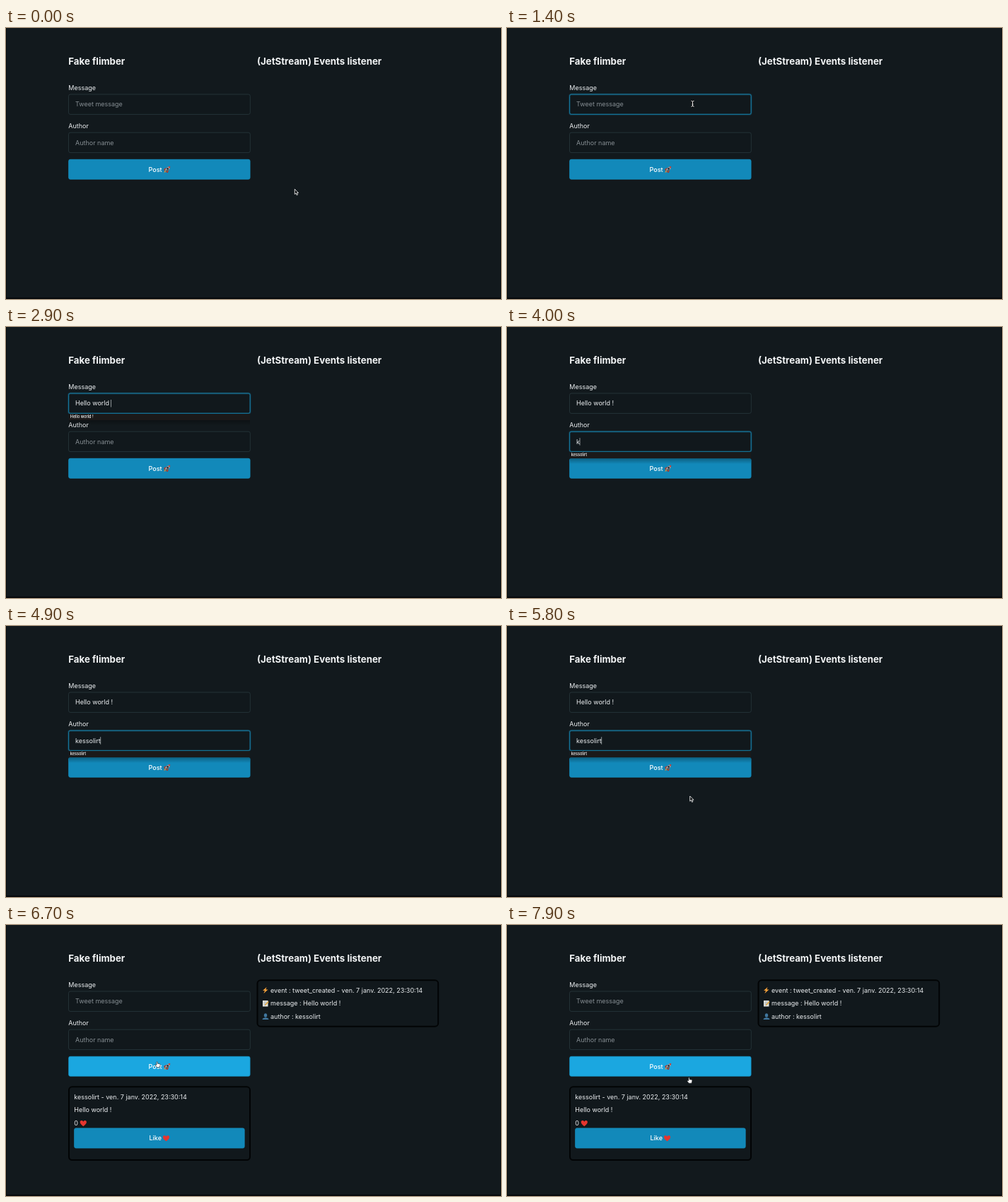
Recreate the animation shown at these times as an HTML page. Size 700 px wide and 384 px high, loop 8000 ms.

```html
<!DOCTYPE html>
<html lang="en">
<head>
<meta charset="utf-8">
<title>Event demo</title>
<style>
html, body { margin: 0; width: 100%; height: 100%; overflow: hidden; background: #12191d; }
svg { display: block; }
text { font: 9px Inter, "Open Sans", sans-serif; fill: #ebeef0; white-space: pre; }
.title { font-size: 13.28px; font-weight: 700; fill: #f2f4f5; }
.button { font-weight: 500; fill: #fff; }
.hint { font-size: 5.5px; font-weight: 500; fill: #fff; }
.card { fill: #11181c; stroke: #020405; stroke-width: 2; }
</style>
</head>
<body>
<svg width="700" height="384" viewBox="0 0 700 384">
  <defs>
    <path id="heart" d="M0 4.2C-2 2.6-4.6.6-4.6-1.6C-4.6-4.6-1-4.8 0-2.2C1-4.8 4.6-4.6 4.6-1.6C4.6.6 2 2.6 0 4.2Z" fill="#e5352f"/>
    <g id="rocket">
      <path d="M-1-2.6L-4.4-.8L-3.8 1.6L-.6 1ZM2.4 1L1.1 4.4L-1.2 4L-.9 .8Z" fill="#a8342b"/>
      <path d="M4.3-4.5C1.2-4.5-2-2.4-3 1.5L-1.4 3.1C2.5 1.9 4.5-1.4 4.3-4.5Z" fill="#9aa1a6"/>
      <path d="M-3 1.5L-1.4 3.1Q1.6 2 3.2-.6L-1.6 1.4Z" fill="#4d4a4c"/>
      <path d="M4.5-4.7L1.6-4.1L4-1.8Z" fill="#c8382e"/>
      <circle cx=".9" cy="-1.3" r="1.3" fill="#22333f"/>
      <path d="M-2.8 1.3L-4.6 4.5L-1.2 2.9Z" fill="#e88f30"/>
    </g>
    <linearGradient id="shade" x2="0" y2="1">
      <stop stop-color="#000" stop-opacity=".3"/>
      <stop offset="1" stop-color="#000" stop-opacity="0"/>
    </linearGradient>
  </defs>
  <rect width="700" height="384" fill="#12191d"/>
  <path d="M0 0H.8V382H699.2V0H700V384H0Z" fill="#06090b"/>
  <text class="title" x="88.3" y="51.5">Fake flimber</text>
  <text class="title" x="355" y="51.5">(JetStream) Events listener</text>
  <text x="88.3" y="87.8">Message</text>
  <text x="88.3" y="142.2">Author</text>

  <rect id="post" x="88.6" y="186.3" width="256.5" height="28" rx="2.3" stroke="#1795c8" stroke-width=".7"/>
  <text class="button" x="201.5" y="203.8">Post</text>
  <use href="#rocket" x="227.7" y="200.7"/>
  <g id="fields"></g>

  <g id="posted">
    <rect class="card" x="89" y="229.3" width="256" height="103.7" rx="4.5"/>
    <text x="96.3" y="247">kessolirt - ven. 7 janv. 2022, 23:30:14</text>
    <text x="96.3" y="265.3">Hello world !</text>
    <text x="96.3" y="283.8">0</text>
    <use href="#heart" x="109.3" y="281"/>
    <rect x="96.6" y="287.9" width="240.6" height="28.2" rx="2.3" fill="#1289ba" stroke="#1795c8" stroke-width=".7"/>
    <text class="button" x="202.5" y="305.3">Like</text>
    <use href="#heart" x="226.5" y="302.3"/>

    <rect class="card" x="355.5" y="78.3" width="255.7" height="65.4" rx="4.5"/>
    <path d="M368.5 88L363 93H366L364.4 97L370.5 91.6H367.4Z" fill="#f6a13a"/>
    <text x="374" y="95.6">event : tweet_created - ven. 7 janv. 2022, 23:30:14</text>
    <path d="M363 107H370.5V115.5H363Z" fill="#e2e4df"/>
    <path d="M364.3 109H369M364.3 111H368M364.3 113H367" stroke="#858d90" stroke-width=".6"/>
    <path d="M366.5 113.5L371.2 108.5" stroke="#e2a335" stroke-width="1.6"/>
    <text x="374" y="114.2">message : Hello world !</text>
    <path d="M362.5 134C362.5 130.3 371.5 130.3 371.5 134Z" fill="#40779f"/>
    <ellipse cx="367" cy="128" rx="2.2" ry="2.8" fill="#40779f"/>
    <text x="374" y="132.6">author : kessolirt</text>
  </g>

  <g id="pointer" stroke-linejoin="round">
    <path id="arrow" d="M0 0V7.2L1.7 5.8L2.9 8.5L4.2 7.9L3 5.3H5.2Z" fill="#0a0d0f" stroke="#fff" stroke-width=".8"/>
    <g id="beam" fill="none">
      <path d="M-2-4Q0-4 0-2.6Q0-4 2-4M0-3V3M-2 4Q0 4 0 2.6Q0 4 2 4M-1 .8H1" stroke="#000" stroke-width="2.2"/>
      <path d="M-2-4Q0-4 0-2.6Q0-4 2-4M0-3V3M-2 4Q0 4 0 2.6Q0 4 2 4M-1 .8H1" stroke="#fff" stroke-width=".9"/>
    </g>
    <path id="hand" d="M-1.6 .3V-3.4Q-.9-4.5-.2-3.4V-1.2L2.8-.7Q3.8-.4 3.6 .8L2.8 4.2H-1.2L-3.4 1.3Q-3.5 0-2.4 .3L-1.6 1.1Z" fill="#fff" stroke="#101518" stroke-width=".6"/>
  </g>
</svg>
<script>
const $ = id => document.getElementById(id);
const ramp = (t, from, length = 200) => Math.max(0, Math.min(1, (t - from) / length));
const show = (node, on) => node.setAttribute("display", on ? "inline" : "none");
const range = (from, n) => Array.from({ length: n }, (_, i) => from + i * 100);
const SENT = 6600;

const fields = [
  { y: 94, value: "Hello world !", placeholder: "Tweet message", focus: 600, blur: 3500,
    keys: [...range(1500, 3), 2000, 2100, ...range(2300, 7), 3100] },
  { y: 148.2, value: "kessolirt", placeholder: "Author name", focus: 3500, blur: 6300,
    keys: [3900, ...range(4100, 4), 4600, 4700, 4750, 4800] }
];

for (const f of fields) {
  const g = document.createElementNS("http://www.w3.org/2000/svg", "g");
  const box = `x="88.5" y="${f.y}" width="256.8" height="28.4" rx="2.5"`;
  g.innerHTML = `
    <rect ${box} fill="#11181c" stroke="#26363a" stroke-width=".9"/>
    <g fill="none" stroke="#14749a">
      <rect ${box} stroke-width="2.4" opacity=".35"/>
      <rect ${box}/>
    </g>
    <text x="98" y="${f.y + 17.4}"></text>
    <rect y="${f.y + 9}" width=".7" height="10.5" fill="#c4cacd"/>
    <g>
      <rect x="89" y="${f.y + 29}" width="256" height="9" fill="#1b1919"/>
      <rect x="89" y="${f.y + 38}" width="256" height="8" fill="url(#shade)"/>
      <text class="hint" x="90.8" y="${f.y + 35.2}">${f.value}</text>
    </g>`;
  [, f.ring, f.text, f.caret, f.list] = g.children;
  $("fields").append(g);
}

// Time, x, y: the pointer glides between neighbouring points.
const path = [
  [0, 408.3, 228.3], [300, 271.5, 112.5], [500, 271.5, 112.5], [700, 262.5, 107.3],
  [4900, 262.5, 107.3], [5000, 265, 114], [5200, 289, 128], [5400, 284, 145],
  [5600, 270, 190], [5800, 258.7, 241], [6000, 258, 242], [6200, 234, 214],
  [6400, 214.5, 197.5], [7000, 214.5, 197.5], [7400, 258.3, 207], [7800, 258.3, 207], [7900, 258.3, 220]
];

function position(t) {
  const i = path.findIndex(p => p[0] > t);
  if (i < 0) return path.at(-1).slice(1);
  const [a, b] = [path[i - 1], path[i]];
  const k = (t - a[0]) / (b[0] - a[0]);
  return [1, 2].map(n => a[n] + (b[n] - a[n]) * k);
}

function drawField(f, t) {
  const typed = t < SENT ? f.keys.filter(k => k <= t).length : 0;
  const focused = t >= f.focus && t < f.blur;
  const lastEdit = f.keys.filter(k => k <= t).at(-1) ?? f.focus + 300;
  const blink = t >= lastEdit && Math.floor((t - lastEdit) / 500) % 2 === 0;
  f.text.textContent = typed ? f.value.slice(0, typed) : f.placeholder;
  f.text.style.fill = typed ? "" : "#858d92";
  f.ring.setAttribute("opacity", ramp(t, f.focus - 100) - ramp(t, f.blur - 100));
  f.caret.setAttribute("x", 97.7 + (typed ? f.text.getComputedTextLength() : 0));
  show(f.caret, focused && blink);
  show(f.list, focused && typed);
}

function drawPointer(t) {
  const [x, y] = position(t);
  const overField = x < 346 && fields.some(f => y > f.y && y < f.y + 29);
  const kind = t >= 6300 || y > 186 && y < 215 && x < 346 ? "hand" : overField ? "beam" : "arrow";
  for (const id of ["arrow", "beam", "hand"]) show($(id), id === kind);
  $("pointer").setAttribute("transform", `translate(${x} ${y})`);
  show($("pointer"), t < 1500 || t >= 5000);
}

function frame(now) {
  const t = Math.floor(now % 8000 / 100) * 100;
  fields.forEach(f => drawField(f, t));
  drawPointer(t);
  const hover = ramp(t, 6100);
  const mix = (a, b) => a + (b - a) * hover;
  $("post").setAttribute("fill", `rgb(${mix(18, 27)} ${mix(137, 167)} ${mix(186, 224)})`);
  show($("posted"), t >= SENT);
  requestAnimationFrame(frame);
}
requestAnimationFrame(frame);
</script>
</body>
</html>
```
